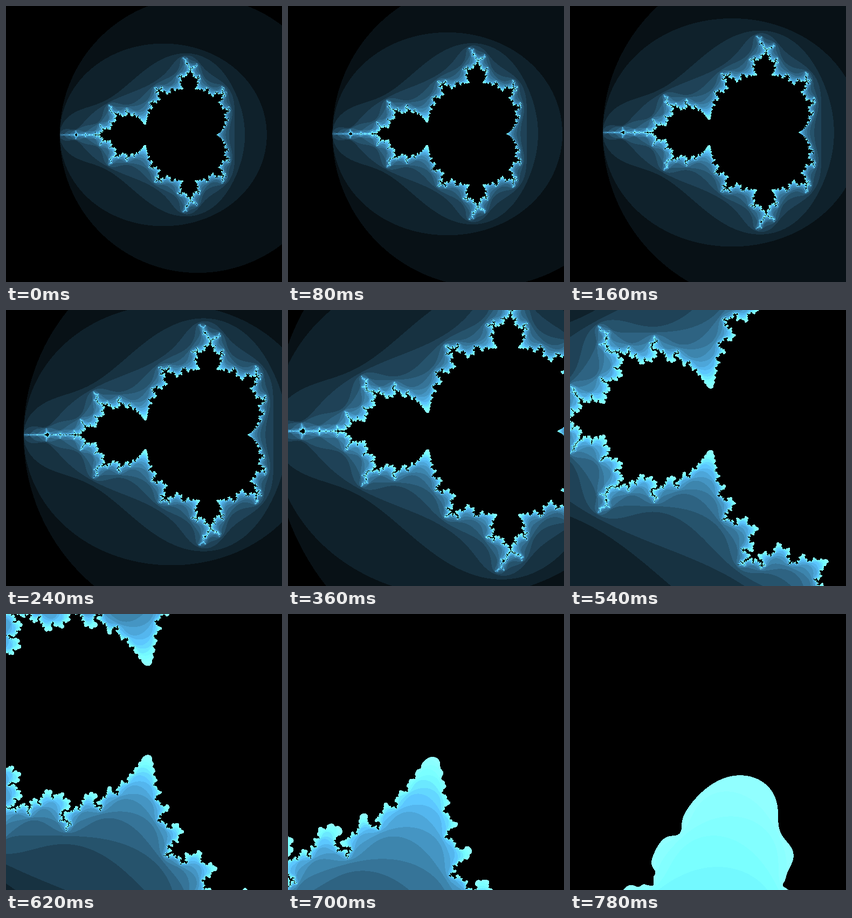
An HTML page with a canvas that plays this animation: 512x512 px, repeating every 0.8 s.

```html
<!DOCTYPE html>
<html lang="en">
<head>
<meta charset="utf-8">
<title>Mandelbrot zoom</title>
<style>
  html, body { margin: 0; width: 100%; height: 100%; overflow: hidden; background: #000; }
  canvas { display: block; width: 512px; height: 512px; }
</style>
</head>
<body>
<canvas id="view" width="512" height="512"></canvas>
<script>
const SIZE = 512, STEPS = 40, STEP_MS = 20, LIMIT = 20;
const CENTER = { re: -0.77568377, im: 0.13646737 };
const GAIN = [0.6, 1.3, 1.7];

const ctx = document.getElementById('view').getContext('2d');

// One flat colour per escape count; points that never escape stay black.
const palette = Array.from({ length: LIMIT + 1 }, (_, n) =>
  GAIN.map(g => n < LIMIT ? Math.min(255, Math.round(g * 255 * n / LIMIT)) : 0));

function escapeCount(re, im) {
  let x = re, y = im, n = 0;
  while (n < LIMIT) {
    const xx = x * x, yy = y * y;
    if (xx + yy > 4) break;
    y = 2 * x * y + im;
    x = xx - yy + re;
    n++;
  }
  return n;
}

// The visible width shrinks linearly from 4 to 0.1.
function render(step) {
  const unit = (4 - 0.1 * step) / SIZE;
  const image = ctx.createImageData(SIZE, SIZE);
  const px = image.data;
  let i = 0;
  for (let row = 0; row < SIZE; row++) {
    const im = CENTER.im + (row - SIZE / 2) * unit;
    for (let col = 0; col < SIZE; col++) {
      const c = palette[escapeCount(CENTER.re + (col - SIZE / 2) * unit, im)];
      px[i++] = c[0];
      px[i++] = c[1];
      px[i++] = c[2];
      px[i++] = 255;
    }
  }
  return image;
}

const cache = [];
const start = performance.now();
let shown = -1;

function draw() {
  const step = Math.floor((performance.now() - start) / STEP_MS) % STEPS;
  if (step !== shown) {
    cache[step] = cache[step] || render(step);
    ctx.putImageData(cache[step], 0, 0);
    shown = step;
  }
  requestAnimationFrame(draw);
}
draw();
</script>
</body>
</html>
```
